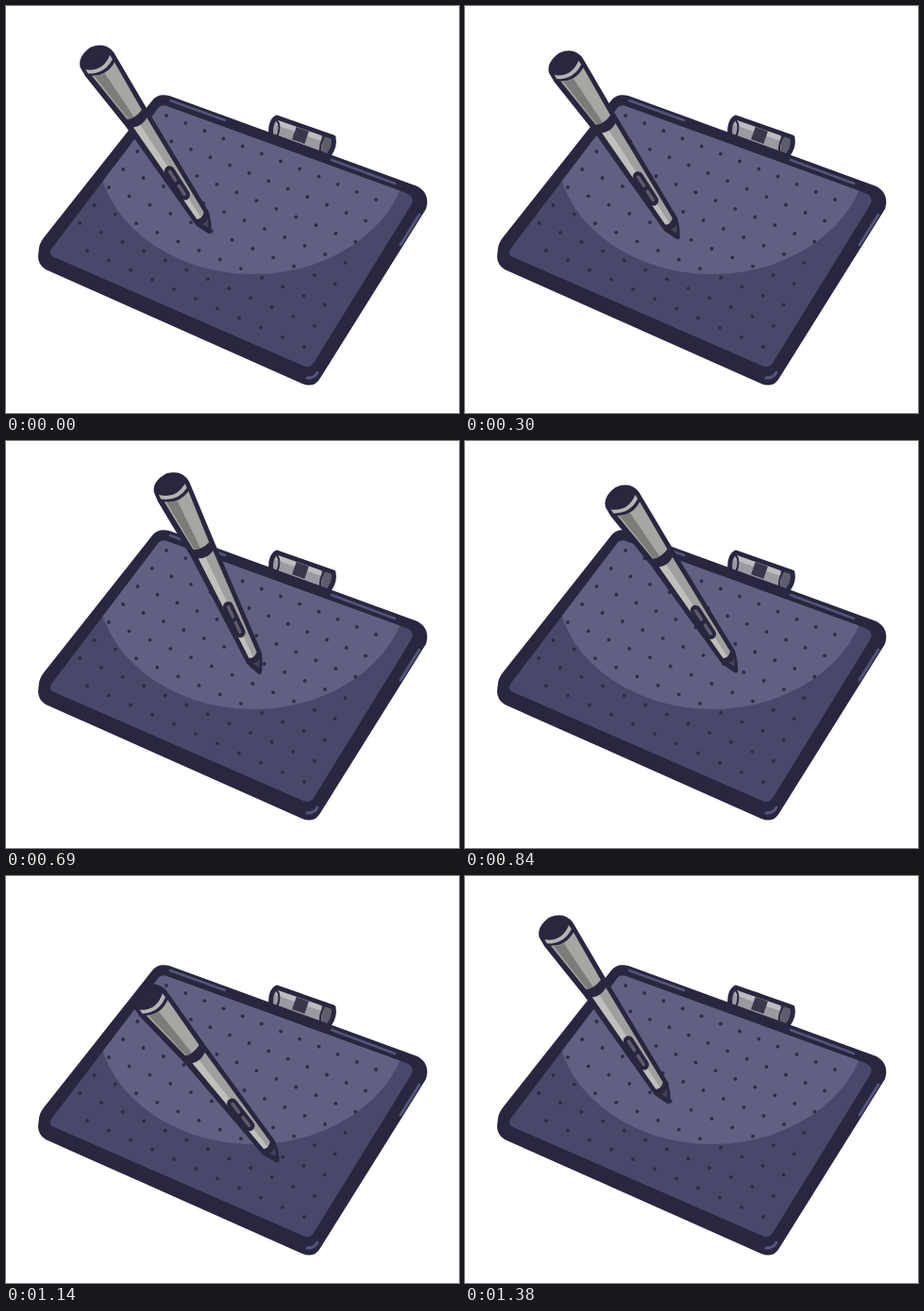
An HTML page that plays this animation: 480 px wide and 431 px high, repeating every 1410 ms.

```html
<!DOCTYPE html>
<html lang="en">
<head>
<meta charset="utf-8">
<title>Pen tablet</title>
<style>
  html, body { margin: 0; width: 100%; height: 100%; overflow: hidden; background: #fff; }
  svg { display: block; width: 100vw; height: 100vh; }
  .ink { fill: #28273f; }
  .line { fill: none; stroke: #28273f; stroke-linecap: round; stroke-linejoin: round; }
  .shine { fill: none; stroke: #55547c; stroke-linecap: round; stroke-linejoin: round; }
</style>
</head>
<body>
<svg viewBox="0 -1 480 431">
  <defs>
    <clipPath id="face">
      <path d="M160 109 Q164 102 173 106 L424 197 Q434 201 429 210 L326 377 Q322 383 315 380 L51 265 Q44 262 49 255 Z"/>
    </clipPath>
  </defs>

  <!-- cloth tab -->
  <g>
    <path d="M286 117 Q281 123 281 137 L338 160 Q347 154 347 139 Z" fill="#9b9aa1"/>
    <path d="M288 117 L343 137 L340 144 L286 125 Z" fill="#bdbdc1"/>
    <path d="M334 135 L348 140 L343 158 L332 157 Q337 148 334 135 Z" fill="#5e5d6c"/>
    <path class="line" stroke-width="5" d="M281 139 Q279 121 287 117 L347 138 Q349 148 342 157"/>
    <path class="line" stroke-width="2" d="M287 120 Q292 126 287 138 M337 137 Q332 145 333 156"/>
    <rect x="-7" y="-7" width="14" height="14" transform="translate(312 136) rotate(19)" fill="#38374c"/>
  </g>

  <!-- tablet -->
  <path class="ink" d="M155 99 Q161 91 173 94 L436 190 Q450 198 445 214 L333 393 Q327 404 314 399 L42 278 Q34 273 34 264 L35 255 Q36 249 41 243 Z"/>
  <g clip-path="url(#face)">
    <rect y="-1" width="480" height="431" fill="#49486a"/>
    <ellipse cx="262" cy="150" rx="165" ry="133" fill="#616082"/>
    <g id="dots" fill="#2e2c49"></g>
  </g>
  <path class="shine" stroke-width="2.5" d="M174 99 L232 120 M345 162 L412 187"/>
  <path class="shine" stroke-width="3" d="M438 220 L418 252 M319 393 Q327 393 330 387"/>

  <!-- pen: tip at 0,0, pointing down -->
  <g id="pen">
    <path class="ink" d="M-21.5 -222 Q-18 -233 -1 -234 Q16 -231 17 -216 L14 -144 L10 -19 Q7 -9 1 0 Q-1 2 -3 -1 L-9 -15 L-15 -144 L-22 -211 Z"/>
    <path d="M-16 -208 Q-3 -199 12 -207 L9 -149 Q-1 -145 -9.5 -149 Z" fill="#a6a6a3"/>
    <path d="M-14 -207 Q-8 -203 -3 -203 L-2 -147 Q-6 -147 -8.5 -149 Z" fill="#7d7d78"/>
    <path d="M-8.5 -138 Q0 -134 9 -139 L5.5 -22 Q0 -17 -4.5 -20 Z" fill="#a09f9d"/>
    <path d="M-8.5 -138 Q-5 -136 -1 -136 L0 -19 L-4.5 -20 Z" fill="#bfbfbb"/>
    <rect x="-7" y="-84" width="11" height="41" rx="5.5" class="ink"/>
    <path d="M-1.5 -78 V-67 M-1.5 -60 V-49" fill="none" stroke="#5d5c69" stroke-width="3.5" stroke-linecap="round"/>
    <path d="M-3 -13 Q2 -11 6 -15 L1 -6 Z" fill="#45435a"/>
    <path d="M-18 -217 Q-4 -205 12 -216 L12 -211 Q-3 -202 -18 -212 Z" fill="#b4b4b4"/>
  </g>
</svg>
<script>
const LOOP = 1410, MOVE = 1380, STEP = 30;

// time, tip x, tip y, tilt in degrees
const keys = [
  [0, 217, 239, -32.8],
  [300, 227, 245, -32.7],
  [510, 257, 319.5, -17],
  [690, 270, 245, -25],
  [960, 298, 263, -37.9],
  [1140, 289, 301, -37.9]
];
const count = keys.length;
const pen = document.getElementById("pen");

// key at any index, wrapping around the cycle
function key(i) {
  const turn = Math.floor(i / count);
  const k = keys[i - turn * count];
  return [k[0] + turn * MOVE, k[1], k[2], k[3]];
}

function slope(i, c) {
  const a = key(i - 1), b = key(i), d = key(i + 1);
  const h = b[0] - a[0], g = d[0] - b[0];
  return ((b[c] - a[c]) / h * g + (d[c] - b[c]) / g * h) / (h + g);
}

// smooth curve through the keys
function value(t, c) {
  let i = 0;
  while (key(i + 1)[0] <= t) i++;
  const a = key(i), b = key(i + 1), h = b[0] - a[0];
  const u = (t - a[0]) / h, v = 1 - u;
  return v * v * (1 + 2 * u) * a[c] + u * u * (3 - 2 * u) * b[c]
    + h * u * v * (v * slope(i, c) - u * slope(i + 1, c));
}

function drawDots() {
  const mix = (a, b, u) => a + (b - a) * u;
  let out = "";
  for (let r = 0; r < 8; r++) {
    for (let c = r < 7 ? 0 : 1; c < 12; c++) {
      const u = c / 11, v = r / 7;
      const x = mix(mix(170, 392, u), mix(63, 316, u), v);
      const y = mix(mix(115, 204, u), mix(248, 360, u), v);
      out += `<circle cx="${x.toFixed(1)}" cy="${y.toFixed(1)}" r="1.9"/>`;
    }
  }
  document.getElementById("dots").innerHTML = out;
}

function draw(ms) {
  const t = Math.floor((ms % LOOP) / STEP) * STEP;
  const [x, y, tilt] = [1, 2, 3].map(c => value(t, c).toFixed(2));
  pen.setAttribute("transform", `translate(${x} ${y}) rotate(${tilt})`);
}

let start;
function tick(now) {
  if (start === undefined) start = now;
  draw(now - start);
  requestAnimationFrame(tick);
}

drawDots();
draw(0);
requestAnimationFrame(tick);
</script>
</body>
</html>
```
